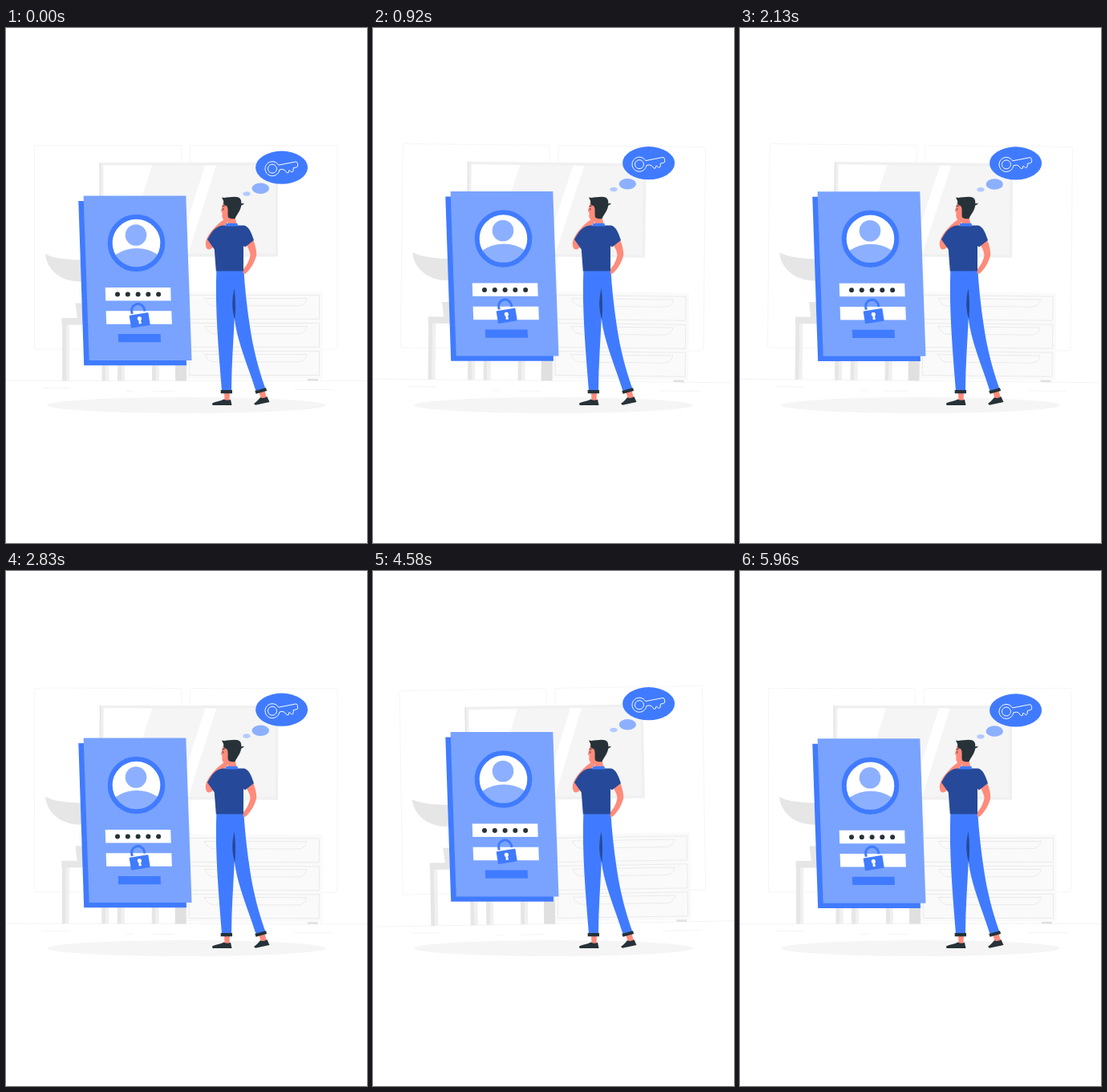
Recreate the animation shown at these times as an HTML page. Size 450 by 643 pixels, loop 6000 ms.

```html
<!DOCTYPE html>
<html lang="en">
<head>
<meta charset="utf-8">
<title>Forgotten password</title>
<style>
  html, body { margin: 0; width: 100%; height: 100%; overflow: hidden; background: #fff; }
  svg { display: block; width: 100%; height: 100%; }
  .blue { fill: #407bff; }
  .navy { fill: #264a99; }
  .pale { fill: #8cb0ff; }
  .skin { fill: #ff8b7b; }
  .dark { fill: #263238; }
  .white { fill: #fff; }
  .line { fill: none; stroke: #407bff; }
</style>
</head>
<body>
<svg viewBox="0 0 450 643">
  <defs>
    <clipPath id="face"><circle cx="162.5" cy="268.5" r="30"/></clipPath>
    <g id="drawer" fill="#fafafa" stroke="#e6e6e6" stroke-width=".8">
      <path d="M228.5 333.5H390.5V363.5H228.5Z"/>
      <path d="M247.5 337.5H375Q373 346.800 364 346.800H259.500Q252 346.800 247.500 337.500Z"/>
    </g>
    <g id="leg">
      <path fill="#e6e6e6" d="M0 366H5V440.500H0Z"/>
      <path fill="#f0f0f0" d="M5 366H9V440.500H5Z"/>
    </g>
  </defs>

  <g id="room">
    <g fill="none" stroke="#f3f3f3" stroke-width=".8">
      <rect x="35.500" y="146.500" width="183" height="254.500" rx="2"/>
      <rect x="229.500" y="146.500" width="183.500" height="254.500" rx="2"/>
    </g>
    <path stroke="#ebebeb" stroke-width=".6" d="M0 440.500H450M46 449.500H80M150 453.500H160M183 453.500H210M359 451.500H408"/>

    <path fill="#f0f0f0" d="M117 168H339V285.500H117Z"/>
    <path fill="#e2e2e2" d="M116.500 168H118V285.500H116.500Z"/>
    <path fill="#f5f5f5" d="M121.500 171.500H335.500V282H121.500Z"/>
    <path class="white" d="M121.500 171.500H182L147 282H121.500ZM248 171.500H262L227 282H213Z"/>

    <path fill="#fafafa" d="M222 329H394.500V438H222Z"/>
    <use href="#drawer"/>
    <use href="#drawer" y="35"/>
    <use href="#drawer" y="70"/>
    <path fill="#e0e0e0" d="M376 438H389V440.500H376Z"/>

    <path fill="#e6e6e6" d="M49 282C60 288 76 289 98 290V316.500C72 319 51 304 49 282Z"/>
    <path fill="#e6e6e6" d="M86.500 343.500H105V363H89Z"/>
    <use href="#leg" x="70"/>
    <use href="#leg" x="119.500"/>
    <use href="#leg" x="139"/>
    <use href="#leg" x="182"/>
    <path fill="#e0e0e0" d="M211 366H225V440.500H211Z"/>
    <path fill="#e6e6e6" d="M69.500 362H225V370.500H69.500Z"/>
  </g>

  <ellipse cx="225" cy="471" rx="174" ry="10" fill="#f5f5f5"/>

  <g class="float">
    <path class="blue" d="M90.300 216H218L225 421.300H97.200Z"/>
    <path fill="#79a3ff" d="M96.600 209.500H224.300L231.500 415H103.700Z"/>
    <circle class="white" cx="162.500" cy="268.500" r="31"/>
    <g class="pale">
      <circle cx="162" cy="258.500" r="13.300"/>
      <ellipse cx="163" cy="301" rx="36" ry="26" clip-path="url(#face)"/>
    </g>
    <circle class="line" cx="162.500" cy="268.500" r="32.800" stroke-width="6"/>
    <path class="white" d="M123.700 324H205.200L205.700 340.500H124.200ZM124.600 353.300H206.300L206.900 369.700H125.200Z"/>
    <g class="dark">
      <circle cx="139" cy="332.400" r="3"/>
      <circle cx="151.800" cy="332.400" r="3"/>
      <circle cx="164.600" cy="332.400" r="3"/>
      <circle cx="177.300" cy="332.400" r="3"/>
      <circle cx="190.100" cy="332.400" r="3"/>
    </g>
    <path class="blue" d="M139.800 382H192.600L193 392.300H140.200Z"/>
    <path class="line" stroke-width="3" d="M157.300 357L156.700 354A8 8 0 0 1 172.300 350.500L173 353.500"/>
    <g transform="translate(166.700 364.900) rotate(-9)">
      <rect class="blue" x="-12" y="-8" width="24" height="16" rx="1"/>
      <circle class="white" cy="-2" r="2.600"/>
      <path class="white" d="M-1-2H1L1.700 4.500H-1.700Z"/>
    </g>
  </g>

  <g id="man">
    <path class="skin" d="M272 455H279L278.500 465H272.500ZM315.500 455L322.500 453L325 461.500L318 463.500Z"/>
    <path class="dark" d="M257 468.500C262 466 268 466 271.500 463.500Q276 466 280 463.800L281.500 471H257.500ZM309 469C313 466.500 315 463.500 317 461.300Q321 463 325.500 460.300L328.500 467L311 470.800Z"/>
    <path class="blue" d="M262.300 303H296.500C298 330 303 372 309 400C313 419 319 438 323.500 450.500L312 454.500C304 428 288 392 284.800 362C283.500 392 281 422 281 453H269C265 402 260.500 352 262.300 303Z"/>
    <path class="navy" d="M284.700 325C281 340 281.500 352 285.300 364Q287 345 284.700 325Z"/>
    <path class="dark" d="M267.700 452H282V456.300H267.700ZM310.300 453L324 449.300L325.200 453L311.600 456.800Z"/>
    <path class="skin" d="M308 264C311 271 312.300 278 312.300 283C310.500 292 304 303 298 307L295.500 305.500L296 301C300 297 304 289 304.500 283C304 278 301 273 298.500 269Z"/>
    <path class="skin" d="M271 217L268 227.500Q267.500 229.500 269.500 230L269.300 235Q270 241 276 239L277 247H288L285 234L282 217Z"/>
    <path class="skin" d="M276 236Q270 240 266.500 243C258 250 248 262 248.800 271Q250 279 256 275.500C260 273 263 262 271 249L277 241Z"/>
    <path class="navy" d="M251 264C256 254 262 247 271 246.500H297C303 248 306 256 309 265L298 273.500L296 272V303.500H261.800L259.800 276.500Z"/>
    <path class="blue" d="M274.500 243.800H288.300L289.500 247.500H273.500Z"/>
    <path class="dark" d="M269 211.500C274 213 283 209.500 290 211.500C294 214 293 217 293.500 219.300L297 218.800Q296 221 293.300 221.500C292 229 287 234 285.500 238Q280 239 277 236.500C276 231 277.500 226 275.500 222.500L271.500 220.500Q272 216 269 211.500Z"/>
    <path class="dark" d="M269.700 222L272.700 221.500V222.500L269.700 223ZM270.300 225.300H271.300V227.300H270.300Z"/>
  </g>

  <g class="float">
    <ellipse cx="300" cy="207" rx="4.600" ry="2.800" fill="#b3caff"/>
    <ellipse class="pale" cx="317.300" cy="200.200" rx="10.700" ry="6.700"/>
    <ellipse class="blue" cx="343.600" cy="174.200" rx="32.500" ry="20.600"/>
    <g transform="translate(332 175.700) rotate(-11)" fill="none" stroke="#fff" stroke-width=".9">
      <path d="M8.500-3H30Q32-3 32-1V1.500Q32 4 29.500 4H26L25 8L23 9L21 6H20L19 8.500H17L14.500 4.300L12 3H8.500A9 9 0 1 1 8.500-3Z"/>
      <circle r="5.500"/>
    </g>
  </g>
</svg>
<script>
  const room = document.getElementById("room");
  const floats = document.querySelectorAll(".float");
  const triangle = x => 1 - Math.abs(2 * (x - Math.floor(x)) - 1);

  function draw(now) {
    // 24 poses per second, with 10 ms rounding of the holds
    const time = Math.floor((now % 6000 + 5) * 0.024) / 24;
    const lift = -9 * triangle(time / 3);
    const tilt = 2 * triangle(time / 6 + 0.25) - 1;
    for (const part of floats) part.setAttribute("transform", `translate(0 ${lift})`);
    room.setAttribute("transform", `rotate(${tilt} 225 300)`);
    requestAnimationFrame(draw);
  }
  draw(performance.now());
</script>
</body>
</html>
```
